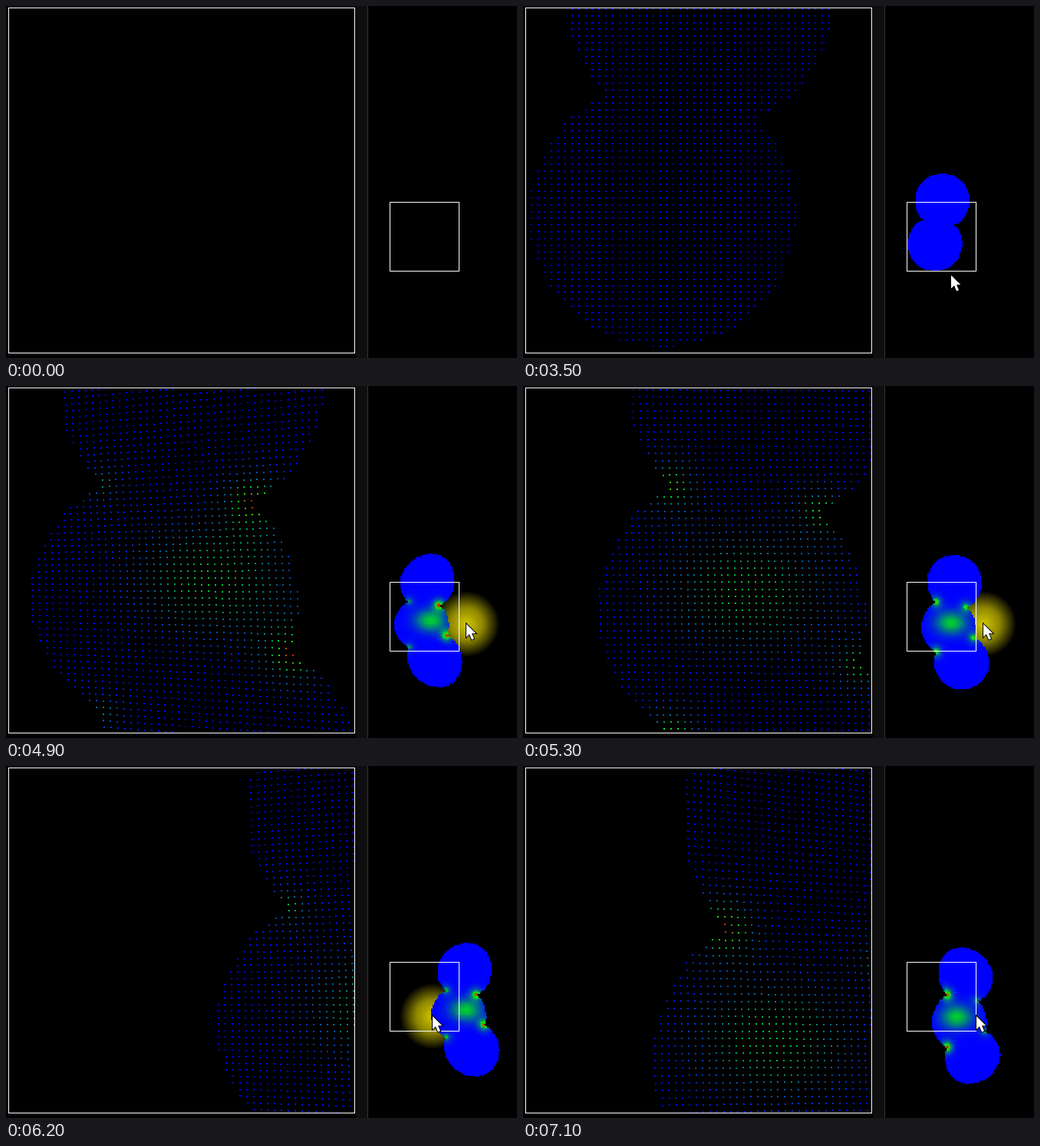
Recreate the animation shown at these times as an HTML page with a canvas. Size 666x460 px, loop 7.2 s.

```html
<!DOCTYPE html>
<html lang="en">
<head>
<meta charset="utf-8">
<title>Soft body</title>
<style>
  html, body { margin: 0; height: 100%; overflow: hidden; background: #000; }
  canvas { display: block; }
</style>
</head>
<body>
<canvas id="stage" width="666" height="460"></canvas>
<script>
const ctx = document.getElementById('stage').getContext('2d');
const LOOP = 7200, STEP = 100, ZOOM = 5, RADIUS = 34.8, SPACING = 8.82 / ZOOM;
const LAUNCH = 4500, SWING = 1500;
const CENTER = { x: 541, y: 305 };

// Discs at rest, each with the time it is placed.
const discs = [
  { x: 546, y: 254, at: 2200 },
  { x: 536.3, y: 310.5, at: 2800 },
  { x: 552, y: 354, at: 3800 },
];

// Key points: time, x, y
const cursorPath = [
  [300, 631, 455], [900, 539, 298], [1600, 536, 249], [2100, 547, 256],
  [2400, 545, 329], [2700, 537, 311], [3500, 558, 352], [LAUNCH, 600, 311],
  [5500, 600, 311], [5800, 590, 327], [6200, 556, 327], [6800, 556, 327],
  [7100, 591, 327],
];
const driftPath = [
  [LAUNCH, 0, 0], [4900, 4.5, 1.7], [5800, 39, 9], [6300, 54, 15],
  [6600, 49.5, 17.7], [7100, 32, 22.5],
];
const glowTimes = [[LAUNCH, 5500], [6200, 6900]];

const clamp = v => Math.max(0, Math.min(1, v));
const dist2 = (p, q) => (p.x - q.x) ** 2 + (p.y - q.y) ** 2;

// Cubic path through the key points that never overshoots them.
function follow(path, t) {
  let i = 0;
  while (i < path.length - 2 && t >= path[i + 1][0]) i++;
  const span = path[i + 1][0] - path[i][0], u = clamp((t - path[i][0]) / span);
  const rate = (j, k) => (path[j + 1][k] - path[j][k]) / (path[j + 1][0] - path[j][0]);
  const slope = (j, k) => {
    if (j === 0 || j === path.length - 1) return 0;
    const a = rate(j - 1, k), b = rate(j, k);
    return a * b > 0 ? 2 * a * b / (a + b) : 0;
  };
  const [x, y] = [1, 2].map(k => path[i][k]
    + (path[i + 1][k] - path[i][k]) * u * u * (3 - 2 * u)
    + span * u * (1 - u) * ((1 - u) * slope(i, k) - u * slope(i + 1, k)));
  return { x, y };
}

// The two points where the outlines of two discs meet: left, right.
function notchPair(a, b) {
  const dx = b.x - a.x, dy = b.y - a.y, d = Math.hypot(dx, dy);
  const h = Math.sqrt(RADIUS ** 2 - d * d / 4) / d;
  return [-1, 1].map(side => ({
    side,
    x: (a.x + b.x) / 2 + dy * h * side,
    y: (a.y + b.y) / 2 - dx * h * side,
  }));
}
const notches = [...notchPair(discs[0], discs[1]), ...notchPair(discs[1], discs[2])];

function makeParticles() {
  const list = [];
  for (let y = 256.9 - 23 * SPACING; y < 390; y += SPACING) {
    for (let x = 502.1 - SPACING; x < 590; x += SPACING) {
      const p = { x, y };
      const owners = discs.filter(d => dist2(p, d) <= RADIUS ** 2);
      if (!owners.length) continue;
      p.at = Math.min(...owners.map(d => d.at));
      const w = discs.map(d => Math.exp(-dist2(p, d) / 1200));
      const sum = w[0] + w[1] + w[2];
      p.weights = w.map(v => v / sum);
      p.near = notches.map(n => {
        const d = dist2(p, n);
        return .6 * Math.exp(-d / 10) + .35 * Math.exp(-d / 70);
      });
      list.push(p);
    }
  }
  return list;
}
const particles = makeParticles();

// The body drifts, turns a little and swings between bent right (1) and left (-1).
function poseAt(t) {
  const u = clamp((t - LAUNCH) / 400), load = u * u * (3 - 2 * u);
  const swing = load * Math.cos((t - LAUNCH - 400) / SWING * 2 * Math.PI);
  const stretch = 1 + .045 * (load - swing), turn = .04 * load;
  const drift = follow(driftPath, t);
  const moves = discs.map(d => ({
    x: drift.x + turn * (d.y - CENTER.y),
    y: drift.y + (stretch - 1) * (d.y - CENTER.y),
  }));
  return { load, swing, moves };
}

function place(p, { swing, moves }) {
  let x = p.x, y = p.y + .0018 * swing * (p.y - CENTER.y) * (p.x - CENTER.x);
  moves.forEach((m, i) => {
    x += p.weights[i] * m.x;
    y += p.weights[i] * m.y;
  });
  return { x, y };
}

// Stress runs from blue over green to red.
function color(p, { load, swing }) {
  const dx = (p.x - CENTER.x - 8 * swing) / 20, dy = (p.y - CENTER.y) / 14;
  let s = .4 * load * Math.exp(-dx * dx - dy * dy);
  notches.forEach((n, i) => s += p.near[i] * (.65 * load + .35 * swing * n.side));
  const k = 2 * clamp(s) - 1;
  const rgb = [clamp(k), 1 - Math.abs(k), clamp(-k)].map(v => Math.round(v * 255));
  return `rgb(${rgb})`;
}

function drawGlow({ x, y }) {
  const g = ctx.createRadialGradient(x, y, 0, x, y, 43);
  g.addColorStop(0, '#d2c800');
  g.addColorStop(.5, '#8c8500');
  g.addColorStop(1, '#000');
  ctx.fillStyle = g;
  ctx.beginPath();
  ctx.arc(x, y, 43, 0, 7);
  ctx.fill();
}

function dot(x, y, size) {
  ctx.fillRect(Math.round(x) - 1, Math.round(y) - 1, size, size);
}

function drawBody(t) {
  const pose = poseAt(t);
  for (const p of particles) {
    if (t < p.at) continue;
    const { x, y } = place(p, pose);
    ctx.fillStyle = color(p, pose);
    dot(x, y, 3);
    const zx = 3 + (x - 500.5) * ZOOM, zy = 2 + (y - 256.5) * ZOOM;
    if (zx > 4 && zx < 454 && zy > 3 && zy < 453) dot(zx, zy, 2);
  }
}

const arrow = new Path2D('M0 0V17L4 13.3L7 20.5L10 19.2L7 12.3H12.3Z');

function drawCursor({ x, y }) {
  ctx.save();
  ctx.translate(Math.round(x), Math.round(y));
  ctx.strokeStyle = '#000';
  ctx.lineWidth = 2;
  ctx.stroke(arrow);
  ctx.fillStyle = '#fff';
  ctx.fill(arrow);
  ctx.restore();
}

function draw(t) {
  ctx.fillStyle = '#000';
  ctx.fillRect(0, 0, 666, 460);
  ctx.fillStyle = '#0e0e0e';
  ctx.fillRect(456, 0, 15, 460);
  ctx.fillStyle = '#333';
  ctx.fillRect(471, 0, 1, 460);

  const cursor = follow(cursorPath, t);
  if (glowTimes.some(([from, to]) => t >= from && t < to)) drawGlow(cursor);
  drawBody(t);

  ctx.strokeStyle = '#fff';
  ctx.lineWidth = 1;
  ctx.strokeRect(3.5, 2.5, 451, 451);
  ctx.strokeRect(500.5, 256.5, 90, 90);
  if (t >= 300) drawCursor(cursor);
}

const start = performance.now();
function tick() {
  const t = (performance.now() - start) % LOOP;
  draw(Math.floor(t / STEP) * STEP);
  requestAnimationFrame(tick);
}
tick();
</script>
</body>
</html>
```
